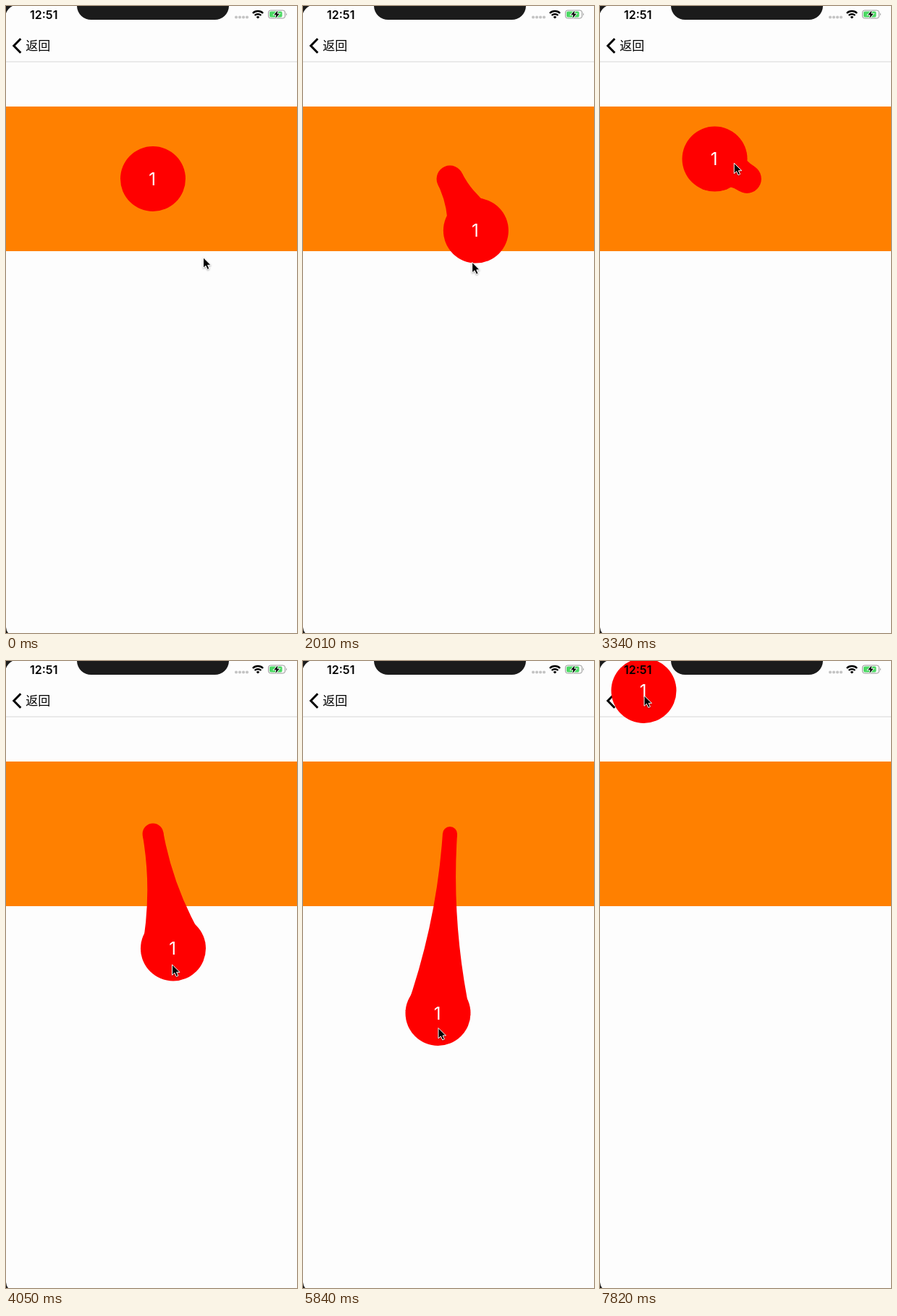
Write an HTML page that moves like this. It is 402x867 px and loops after 8000 ms.

```html
<!DOCTYPE html>
<html lang="zh">
<head>
<meta charset="utf-8">
<title>Sticky bubble</title>
<style>
  html, body { margin: 0; width: 100%; height: 100%; overflow: hidden; background: #fdfdfd; }
  svg { display: block; width: 100vw; height: 100vh; }
  .clock { font: 600 16px Inter, "Liberation Sans", sans-serif; }
  .back { font: 400 17px "Noto Sans CJK SC", "Noto Sans CJK", sans-serif; }
  .count { font: 400 24px Inter, "Liberation Sans", sans-serif; fill: #fff; text-anchor: middle; }
  #cursor { filter: drop-shadow(0 1px 1px rgba(0, 0, 0, .35)); }
</style>
</head>
<body>
<svg viewBox="0 0 402 867">
  <rect width="402" height="867" fill="#fdfdfd"/>
  <rect y="76.5" width="402" height="1.2" fill="#dedede"/>
  <path d="M20.3 45.2L10.8 55L20.3 64.8" fill="none" stroke="#000" stroke-width="3"/>
  <text class="back" x="27.3" y="61.3">返回</text>
  <rect y="139" width="402" height="200" fill="#ff8000"/>

  <g fill="#f00">
    <path id="neck"/>
    <circle id="root" cx="203" cy="239"/>
    <g id="bubble">
      <circle r="45"/>
      <text class="count" x="-1" y="8.5">1</text>
    </g>
  </g>

  <text class="clock" x="33" y="17.5">12:51</text>
  <path d="M318 15.5h16" stroke="#c4c4c4" stroke-width="4.2" stroke-linecap="round" stroke-dasharray="0 5"/>
  <g fill="none" stroke="#000" stroke-width="2.4">
    <path d="M340.9 10A10 10 0 0 1 355.1 10"/>
    <path d="M343.6 13A6.3 6.3 0 0 1 352.4 13"/>
    <path d="M348 17.5L345.7 15.2A3.3 3.3 0 0 1 350.3 15.2Z" fill="#000" stroke="none"/>
  </g>
  <rect x="362.5" y="6" width="23" height="11" rx="3" fill="#fdfdfd" stroke="#969696"/>
  <rect x="364" y="7.5" width="17.5" height="8" rx="1.8" fill="#4cd964"/>
  <path d="M387 9.5q2 2 0 4z" fill="#969696"/>
  <path d="M375.500 6.2L370 12.3H373.4L372.3 17L377.8 10.7H374.4Z" stroke="#fdfdfd" stroke-width="1.6" paint-order="stroke"/>

  <g fill="#1b1b1b">
    <path d="M98 0H308A19.500 19.500 0 0 1 288 19H118A19.500 19.500 0 0 1 98 0Z"/>
    <path d="M0 0H9Q3 3 0 10Z"/>
    <path d="M0 867V859Q.5 864 3 867Z"/>
  </g>

  <path id="cursor" d="M.5 .8V15.3L3.9 12.2L6.3 17.4L8.9 16.2L6.6 11.3H11Z" stroke="#fff"/>
</svg>

<script>
const LOOP = 8000, LAG = 80, R = 45;
const GRAB = 1540, CIRCLING = 2010, LEAVING = 3400, STOP = 4050;
const RELEASE = 4185, REGRAB = 5100, TORN = 6060;
const HOME = [203, 239], LET_GO = [231, 397.5];

// The screen refreshes in bursts, about every 58 ms between these times.
const bursts = [
  [60, 890], [1540, 2300], [2360, 3110], [3170, 3940], [4000, 4050],
  [4230, 4910], [5200, 5960], [6010, 6770], [6830, 7590], [7650, 7820]
];
const steps = [0];
for (const [a, b] of bursts) {
  const n = Math.round((b - a) / 58);
  for (let i = 0; i <= n; i++) steps.push(Math.round((a + (b - a) * i / n) / 10) * 10);
}

// Key points: time, x, y.
const pull = [
  [5140, ...HOME], [5840, 186.5, 487], [5960, 188, 507], [6080, 200, 542], [6300, 220, 430],
  [6650, 195.5, 225], [6770, 168, 176], [7590, 62, 57], [7820, 60.5, 41]
];
const roam = [[0, 272, 347], [800, 190, 251], [4230, 240, 428], [4450, 306, 437], [4910, 203, 245]];
const grip = [[GRAB, -13, 11], [CIRCLING, 29, 25], [2820, -9, 14], [STOP, -2, 21.5]];

const add = (a, b) => [a[0] + b[0], a[1] + b[1]];
const mix = (a, b, k) => a.map((v, i) => v + (b[i] - v) * k);

function ease(t, from, to) {
  const u = Math.min(1, Math.max(0, (t - from) / (to - from)));
  return u * u * (3 - 2 * u);
}

// Smooth curve through key points, held at both ends.
function along(track, t) {
  const last = track.length - 1;
  if (t <= track[0][0]) return track[0].slice(1);
  if (t >= track[last][0]) return track[last].slice(1);
  const i = track.findIndex(k => k[0] > t) - 1;
  const a = track[i], b = track[i + 1], span = b[0] - a[0], u = (t - a[0]) / span;
  const slope = (j, c) => j === 0 || j === last ? 0 :
    (track[j + 1][c] - track[j - 1][c]) / (track[j + 1][0] - track[j - 1][0]);
  return [1, 2].map(c => {
    const m = slope(i, c) * span, n = slope(i + 1, c) * span;
    return a[c] + u * (m + u * (3 * (b[c] - a[c]) - 2 * m - n + u * (2 * (a[c] - b[c]) + m + n)));
  });
}

// Clockwise circles with a breathing radius, eased in from home and out to the drop point.
function swing(t) {
  const s = t - CIRCLING, turn = Math.PI / 4 + s * 0.00753;
  const r = 61 + 5 * Math.cos(Math.PI * s / 810);
  const orbit = [192.2 + r * Math.cos(turn), 263.9 + r * Math.sin(turn)];
  return mix(mix(HOME, orbit, ease(t, GRAB, CIRCLING)), LET_GO, ease(t, LEAVING, STOP));
}

function spring(ms) {
  const zeta = 0.2, w = 69, s = ms / 1000, root = Math.sqrt(1 - zeta * zeta), p = w * root * s;
  return Math.exp(-zeta * w * s) * (Math.cos(p) + zeta / root * Math.sin(p));
}

function center(t) {
  if (t < RELEASE) return swing(t);
  if (t >= REGRAB) return along(pull, t);
  return mix(HOME, LET_GO, spring(t - RELEASE));
}

// While dragging, the pointer runs ahead of the bubble.
function pointer(t) {
  if (t >= GRAB && t < RELEASE) return add(swing(t + LAG), along(grip, t));
  if (t >= REGRAB) return add(along(pull, t + LAG), [0, 6]);
  return along(roam, t);
}

// Two quadratic sides joining the shrinking root to the bubble.
function neckPath(c, d, r) {
  const ux = (c[0] - HOME[0]) / d, uy = (c[1] - HOME[1]) / d;
  const at = (p, side, out) => [p[0] + uy * side + ux * out, p[1] - ux * side + uy * out];
  return `M${at(HOME, r, 0)}Q${at(HOME, r, d / 2)} ${at(c, R, 0)}` +
    `L${at(c, -R, 0)}Q${at(HOME, -r, d / 2)} ${at(HOME, -r, 0)}Z`;
}

const el = id => document.getElementById(id);
const bubble = el('bubble'), neck = el('neck'), root = el('root'), cursor = el('cursor');
const place = (node, [x, y]) => node.setAttribute('transform', `translate(${x} ${y})`);

function draw(t) {
  const c = center(t), d = Math.hypot(c[0] - HOME[0], c[1] - HOME[1]);
  const tied = d > 0.5 && (t < RELEASE || (t >= REGRAB && t < TORN));
  const r = 22.5 - d / 20;
  root.setAttribute('r', tied ? r : 0);
  neck.setAttribute('d', tied ? neckPath(c, d, r) : '');
  place(bubble, c);
  place(cursor, pointer(t));
}

const start = performance.now();
function tick() {
  const now = (performance.now() - start) % LOOP;
  draw(steps.filter(s => s <= now).pop());
  requestAnimationFrame(tick);
}
tick();
</script>
</body>
</html>
```
